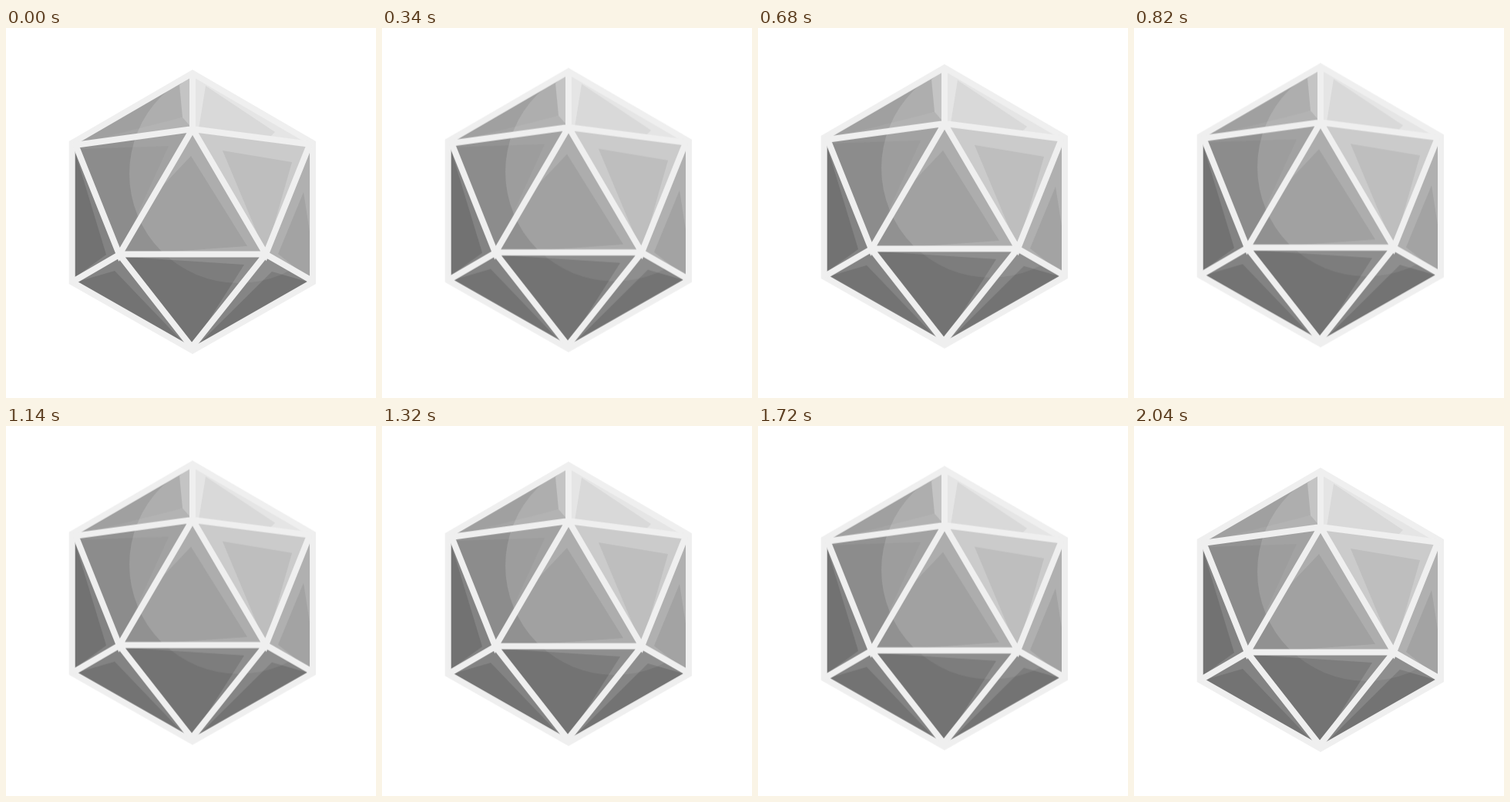
An HTML page for the animation above (2.06 s loop, 480 px wide and 480 px high).

```html
<!DOCTYPE html>
<html lang="en">
<head>
<meta charset="utf-8">
<title>Floating die</title>
<style>
html, body { margin: 0; width: 100%; height: 100%; overflow: hidden; background: #fff; }
svg { display: block; width: 100vw; height: 100vh; }
.die { animation: bob 2060ms infinite cubic-bezier(.37, 0, .63, 1); }
@keyframes bob {
  0%, 100% { transform: translateY(0); }
  50% { transform: translateY(-9.6px); }
}
.edges { fill: none; stroke: #efefef; stroke-width: 8; }
</style>
</head>
<body>
<svg viewBox="0 0 480 480">
  <defs>
    <circle id="glare" cx="302" cy="189" r="142" fill="#fff"/>
    <clipPath id="upper"><path d="M242 58.6V131L337 293.5H147L86 149.4Z"/></clipPath>
    <clipPath id="lower"><path d="M147 293.5H337L398 329.6L242 418.4Z"/></clipPath>
  </defs>
  <g class="die">
    <!-- top left -->
    <path fill="#a0a0a0" d="M242 58.6V131L86 152Z"/>
    <path fill="#b9b9b9" d="M242 58.6V131L140 144L229 116L225 74Z"/>
    <path fill="#a5a5a5" d="M229 116L242 131L86 152Z"/>
    <!-- middle left -->
    <path fill="#8c8c8c" d="M86 152L242 131L147 293Z"/>
    <path fill="#929292" d="M86 152L242 131L147 293L211 153L97 157Z"/>
    <!-- centre -->
    <path fill="#9f9f9f" d="M242 131L147 294H337Z"/>
    <path fill="#919191" d="M240 166L203 205L147 294L200 291L313 283Z"/>
    <!-- far left -->
    <path fill="#838383" d="M86 149L147 294L86 330Z"/>
    <path fill="#727272" d="M86 149L130 294L86 326Z"/>
    <!-- bottom left -->
    <path fill="#838383" d="M86 330L147 294L242 415Z"/>
    <path fill="#737373" d="M86 331L141 315L230 408L242 418Z"/>
    <!-- bottom centre -->
    <path fill="#858585" d="M147 293H337L241 414Z"/>
    <path fill="#737373" d="M155 297L309 307L241 414Z"/>
    <!-- bottom right -->
    <path fill="#858585" d="M337 293L398 329L242 414Z"/>
    <path fill="#737373" d="M345 316L394 330L242 418Z"/>
    <!-- glare -->
    <g clip-path="url(#upper)"><use href="#glare" opacity=".15"/></g>
    <g clip-path="url(#lower)"><use href="#glare" opacity=".07"/></g>
    <!-- top right -->
    <path fill="#e5e5e5" d="M242 58.6L398 151L242 131Z"/>
    <path fill="#d9d9d9" d="M259 75L349 135L340 144L250 131Z"/>
    <!-- middle right -->
    <path fill="#cbcbcb" d="M242 131L396 151L337 293Z"/>
    <path fill="#bebebe" d="M281 159L371 174L337 293Z"/>
    <!-- far right -->
    <path fill="#b0b0b0" d="M398 149V329L337 293Z"/>
    <path fill="#a3a3a3" d="M386 213L398 290V329L353 293Z"/>
    <g class="edges">
      <path d="M242 58.6L398 149.4V329.6L242 418.4L85.7 329.6V149.4Z"/>
      <path d="M242 60V131M87 152.3L242 131L396 151M90 151L147 294L242 131L337 293.5L394 151M147 293.5H337M86 329.5L147 294L241 414L337 293.5L398 328.5"/>
    </g>
  </g>
</svg>
</body>
</html>
```
